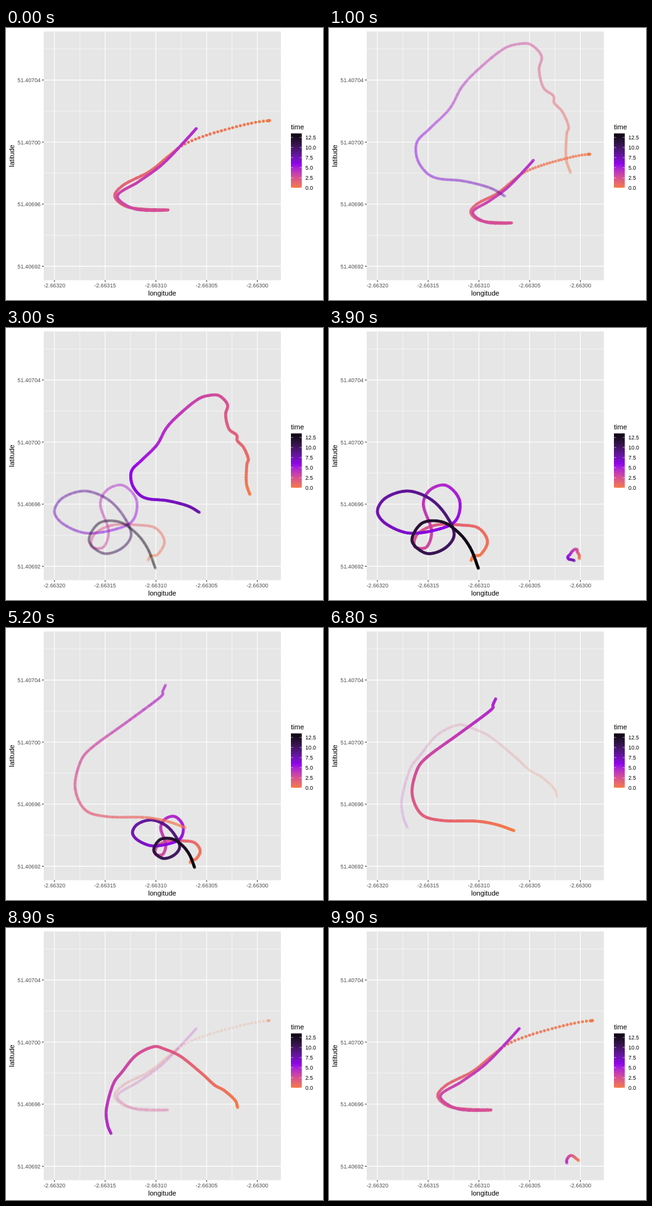
Write an HTML page with a canvas that moves like this. It is 504 px wide and 432 px high and loops after 10000 ms.

```html
<!DOCTYPE html>
<html lang="en">
<head>
<meta charset="utf-8">
<title>Tracks over time</title>
<style>
html, body { margin: 0; width: 504px; height: 432px; overflow: hidden; background: #fff; }
svg, canvas { position: absolute; left: 0; top: 0; }
text { font: 8.8px "Liberation Sans", Arial, sans-serif; }
.axis { fill: #4d4d4d; }
.title { font-size: 11px; }
</style>
</head>
<body>
<svg id="chart" width="504" height="432"></svg>
<canvas id="dots" width="504" height="432"></canvas>
<script>
const STEP = 100, PER_STATE = 20, HOLD = 7;
const HOME = { x: 399.6, y: 378.4 };
const MAX_TIME = 13.5, MID_TIME = 5.8;
const CORAL = "#f47b46", PURPLE = "#9200ee", BLACK = "#000";

const mix = (a, b, u) => `color-mix(in lab, ${a}, ${b} ${(u * 100).toFixed(1)}%)`;
const colour = time => time < MID_TIME
  ? mix(CORAL, PURPLE, time / MID_TIME)
  : mix(PURPLE, BLACK, (time - MID_TIME) / (MAX_TIME - MID_TIME));

// Static chart
function drawChart() {
  const out = [];
  const line = (x1, y1, x2, y2, stroke, width) =>
    out.push(`<line x1="${x1}" y1="${y1}" x2="${x2}" y2="${y2}" stroke="${stroke}" stroke-width="${width}"/>`);
  const text = (x, y, str, attrs = "") => out.push(`<text x="${x}" y="${y}" ${attrs}>${str}</text>`);
  const gridX = i => 77 + i * 80.65, gridY = i => 82.6 + i * 98.6;
  const L = 60, R = 437, T = 5.5, B = 400.5;

  out.push(`<rect x="${L}" y="${T}" width="${R - L}" height="${B - T}" fill="#e6e6e6"/>`);
  for (let i = 0; i < 4; i++) {
    line(L, gridY(i - .5), R, gridY(i - .5), "#fff", .53);
    line(gridX(i + .5), T, gridX(i + .5), B, "#fff", .53);
  }
  for (let i = 0; i < 4; i++) {
    const y = gridY(i);
    line(L, y, R, y, "#fff", 1.07);
    line(L - 2.75, y, L, y, "#333", 1.07);
    text(55, y + 3.4, (51.40704 - i * .00004).toFixed(5), 'class="axis" text-anchor="end"');
  }
  for (let i = 0; i < 5; i++) {
    const x = gridX(i);
    line(x, T, x, B, "#fff", 1.07);
    line(x, B, x, B + 2.75, "#333", 1.07);
    text(x, 412, (-2.6632 + i * .00005).toFixed(5), 'class="axis" text-anchor="middle"');
  }
  text(248.3, 425, "longitude", 'class="title" text-anchor="middle"');
  text(0, 0, "latitude", 'class="title" text-anchor="middle" transform="translate(13.3 203) rotate(-90)"');

  text(453, 161, "time", 'class="title"');
  out.push('<linearGradient id="ramp" x1="0" y1="1" x2="0" y2="0">');
  for (let u = 0; u <= 1; u += .05) {
    out.push(`<stop offset="${u}" style="stop-color:${colour(u * MAX_TIME)}"/>`);
  }
  out.push('</linearGradient><rect x="453" y="167.4" width="17.3" height="86.4" fill="url(#ramp)"/>');
  for (let i = 0; i < 6; i++) {
    const y = 253.8 - i * 16;
    line(453, y, 456.5, y, "#fff", .5);
    line(466.8, y, 470.3, y, "#fff", .5);
    text(475.9, y + 3.4, (i * 2.5).toFixed(1));
  }
  document.getElementById("chart").innerHTML = out.join("");
}

// Smooth curve through a few key points, finely sampled (centripetal Hermite spline)
function smooth(keys) {
  const pts = keys.trim().split(/\s+/).map(p => p.split(",").map(Number));
  const at = [0];
  for (let i = 1; i < pts.length; i++) {
    const [ax, ay] = pts[i - 1], [bx, by] = pts[i];
    at.push(at[i - 1] + Math.sqrt(Math.hypot(bx - ax, by - ay)));
  }
  const slope = (i, k) => {
    const a = Math.max(i - 1, 0), b = Math.min(i + 1, pts.length - 1);
    return (pts[b][k] - pts[a][k]) / (at[b] - at[a]);
  };
  const samples = [];
  for (let i = 0; i < pts.length - 1; i++) {
    const h = at[i + 1] - at[i];
    for (let t = 0; t < 1; t += 1 / 64) {
      const ease = t * t * (3 - 2 * t);
      samples.push([0, 1].map(k =>
        pts[i][k] + (pts[i + 1][k] - pts[i][k]) * ease +
        h * t * (1 - t) * (slope(i, k) * (1 - t) - slope(i + 1, k) * t)));
    }
  }
  return samples;
}

// Dots along a curve; gap(d) is the spacing at distance d
function track(duration, gap, keys) {
  const dots = [];
  let run = 0, next = 0, last;
  for (const [x, y] of smooth(keys)) {
    if (last) run += Math.hypot(x - last[0], y - last[1]);
    last = [x, y];
    if (run >= next) {
      dots.push({ x, y });
      next += gap(run);
    }
  }
  dots.forEach((dot, i) => dot.fill = colour(duration * i / dots.length));
  return dots;
}

const dense = () => 1.7;
const slowing = d => d < 3 ? .7 : d < 150 ? 6.2 : 2.7;
const tracks = [
  track(4.6, slowing, `419,147 396,150 358,159 317,171 283,185 258,204 228,228 186,250 173,268
    196,285 258,289 205,287.5 177,267 211,244 248,217 286,178 304,158`),
  track(8, dense, `384,230 377,207 378,168 381,157 371,133 358,119 357,108 341,95 334,66 338,45
    322,27 305,25 278,33 236,67 211,94 192,128 160,160 140,181 140,207 154,229 173,239 213,243
    256,254 281,268`),
  track(13.5, dense, `226,369 230,362 241,360 252,339 238,318 210,313 170,313 141,327 136,347
    155,348 163,322 150,280 161,257 186,250 207,272 204,302 183,317 130,326 92,312 77,292 90,270
    125,259 160,271 185,296 199,328 184,350 155,358 132,338 148,310 180,308 207,326 225,350 238,383`),
  track(4.8, dense, `285,317 256,307 222,301 160,299.5 126,289 110,255 117,216 133,193 190,151
    235,118 249,106 249,101 254,90`),
  track(4.7, dense, `362.5,268 358,255 337,236 319,226 296,205 255,172 224,158 205,154 172,170
    145,202 129,224 116,271 118,300 125,318`)
];

const ctx = document.getElementById("dots").getContext("2d");

function drawTrack(dots, alpha, scale) {
  ctx.globalAlpha = alpha;
  for (const { x, y, fill } of dots) {
    ctx.fillStyle = fill;
    ctx.beginPath();
    ctx.arc(HOME.x + (x - HOME.x) * scale, HOME.y + (y - HOME.y) * scale, 2.45, 0, 7);
    ctx.fill();
  }
}

let shown = -1;
function tick() {
  const step = Math.floor(performance.now() / STEP) % (PER_STATE * tracks.length);
  if (step !== shown) {
    shown = step;
    const i = Math.floor(step / PER_STATE);
    const q = Math.max(0, step % PER_STATE - HOLD) / (PER_STATE - HOLD);
    ctx.clearRect(0, 0, 504, 432);
    // The old track flies home while fading; the new one fades in where it stands
    drawTrack(tracks[i], 1 - q, 1 - q);
    if (q) drawTrack(tracks[(i + 1) % tracks.length], q, 1);
  }
  requestAnimationFrame(tick);
}

drawChart();
tick();
</script>
</body>
</html>
```
